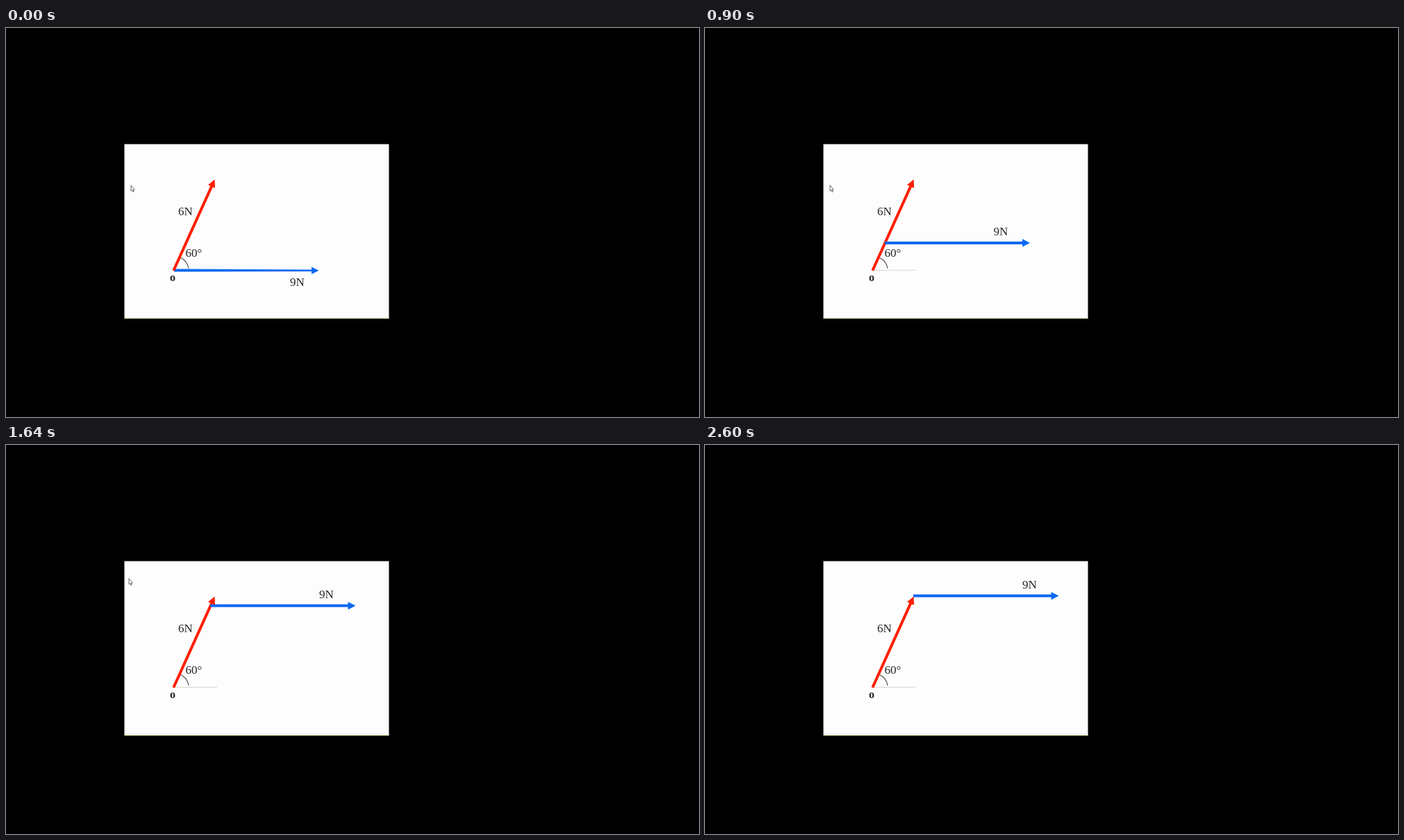
These frames come from a looping animation (998 px wide and 561 px high, 2710 ms). An HTML page:

```html
<!DOCTYPE html>
<html lang="en">
<head>
<meta charset="utf-8">
<title>Adding two forces</title>
<style>
  html, body { margin: 0; width: 100%; height: 100%; overflow: hidden; background: #000; }
  svg { display: block; width: 998px; height: 561px; }
  text { font: 17px "Liberation Serif", "Times New Roman", serif; fill: #262626; }
  .origin { font-weight: bold; font-size: 16px; }
  .red { fill: #ff1e00; }
  .blue { fill: #0868f0; }

  .rest, .moving, .slide, .cursor { animation: 2710ms linear infinite; }
  .rest { animation-name: rest; }
  .moving { animation-name: moving; }
  .slide { animation-name: slide; }
  .cursor { animation-name: leave; }

  @keyframes rest {
    0%, 1.845% { visibility: visible; }
    1.846%, 100% { visibility: hidden; }
  }
  @keyframes moving {
    0%, 1.845% { visibility: hidden; }
    1.846%, 100% { visibility: visible; }
  }
  /* The blue force glides up along the red one */
  @keyframes slide {
    0% { transform: translate(0, 0); }
    2.214% { transform: translate(0, 0); animation-timing-function: cubic-bezier(.333, 0, .667, .344); }
    25.092% { transform: translate(9.5px, -22px); animation-timing-function: cubic-bezier(.333, .264, .667, .592); }
    39.483% { transform: translate(25.2px, -56.5px); animation-timing-function: cubic-bezier(.333, .267, .667, .724); }
    48.339% { transform: translate(40px, -89px); animation-timing-function: cubic-bezier(.333, .433, .667, .766); }
    60.517% { transform: translate(53px, -117.7px); animation-timing-function: cubic-bezier(.333, .6, .667, 1); }
    76.384%, 100% { transform: translate(59px, -132px); }
  }
  @keyframes leave {
    0%, 55.35% { transform: translate(0, 0); }
    60.517% { transform: translate(-3px, -34px); }
    65.7%, 100% { transform: translate(-6px, -72px); }
  }
</style>
</head>
<body>
<svg viewBox="0 0 998 561">
  <defs>
    <clipPath id="panel"><rect x="170.5" y="167.5" width="381" height="251"/></clipPath>
  </defs>
  <rect width="998" height="561" fill="#000"/>
  <rect x="170.5" y="167.5" width="381" height="251.5" fill="#fdfdfd"/>
  <path d="M171 418.6H551.5" stroke="#ffffa8" stroke-width=".9"/>

  <path d="M243 349.3H304" stroke="#d6d5c8" stroke-width="1"/>
  <path d="M250 330.8A21 21 0 0 1 263 347" fill="none" stroke="#5c5656" stroke-width="1.2"/>
  <text x="248" y="270">6N</text>
  <text x="258.5" y="330">60°</text>
  <text class="origin" x="236" y="364.5">o</text>

  <g class="rest">
    <path class="blue" d="M242 347.5L440 348.6V344.5L450.5 349.8L440 355V351L242 351.5Z"/>
    <text x="409" y="372">9N</text>
  </g>

  <!-- Drawn along the x axis, then turned to its slope -->
  <path class="red" transform="translate(241.3 349.8) rotate(-65.7)"
        d="M0-2H133V-5.5L144 0L133 5.5V2H0Z"/>

  <g class="moving">
    <g class="slide">
      <path class="blue" d="M241 347.6H439.5V344L450.5 349.6L439.5 355.2V351.6H241Z"/>
      <text x="398" y="338.5">9N</text>
    </g>
  </g>

  <g clip-path="url(#panel)">
    <path class="cursor" d="M180 226.8V235.2L181.8 233.6L183 236.5L184.2 236L183 233.2H185.3Z"
          fill="#fff" stroke="#555" stroke-width=".9"/>
  </g>
</svg>
</body>
</html>
```
